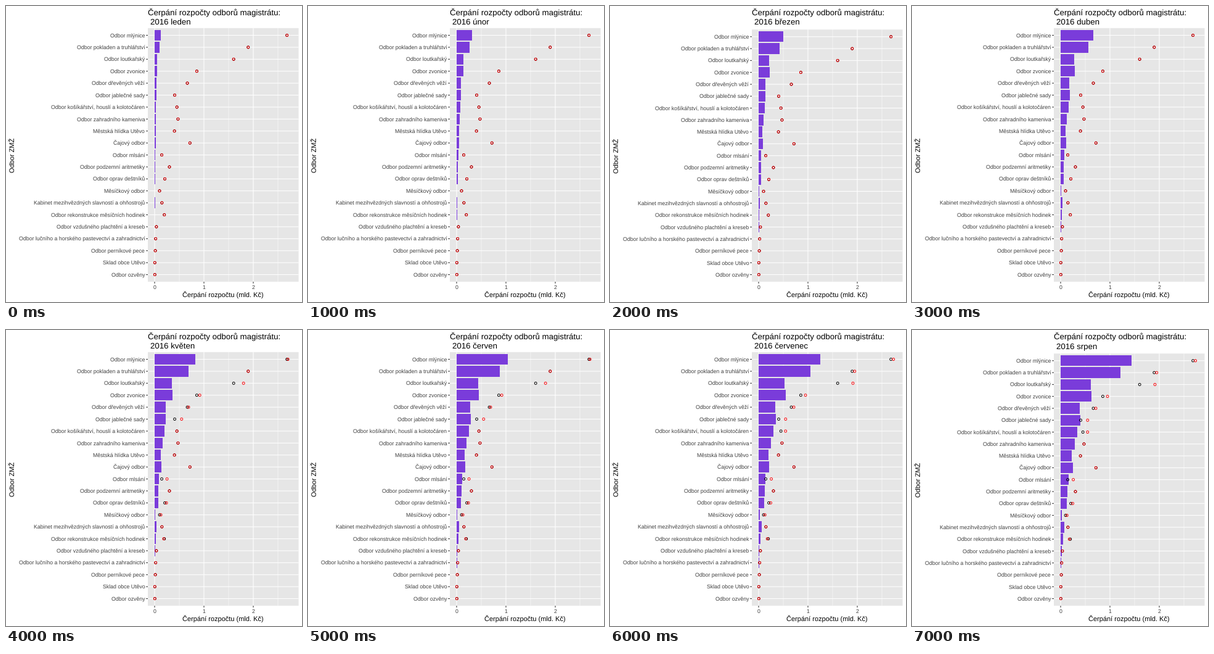
Recreate the animation shown at these times as a matplotlib script. Size 480x480 px, loop 8 s.

```python
import matplotlib.pyplot as plt
import numpy as np
from matplotlib.animation import FuncAnimation
from matplotlib.patches import Circle, Rectangle

plt.rcParams["font.family"] = "Liberation Sans"
plt.rcParams["text.hinting"] = "none"

SIZE = 480
LEFT, RIGHT, BOTTOM = 230, 474.5, 447.2
ZERO, UNIT = 241, 80
LAST_ROW = 435.6

PANEL, BAR, PLAN, REVISED = "#E6E6E6", "#7A3CDA", "#000000", "#FB0207"
TICK, LABEL = "#333333", "#404040"

MONTHS = ["leden", "únor", "březen", "duben",
          "květen", "červen", "červenec", "srpen"]
TALL_TITLE = ("březen", "srpen")

# Name, planned budget, final spending, then the budget increases
# valid from May and from July where there are any (billions).
DEPARTMENTS = [
    ("Odbor mlýnice", 2.683, 1.44, .02, .05),
    ("Odbor pokladen a truhlářství", 1.897, 1.21, 0, .05),
    ("Odbor loutkařský", 1.602, .61, .2, .31),
    ("Odbor zvonice", .855, .625, .06, .095),
    ("Odbor dřevěných věží", .663, .39, .025, .05),
    ("Odbor jablečné sady", .407, .4, .14, .14),
    ("Odbor košíkářství, houslí a kolotočáren", .452, .34, 0, .094),
    ("Odbor zahradního kameniva", .474, .285),
    ("Městská hlídka Utěvo", .402, .225),
    ("Čajový odbor", .716, .25),
    ("Odbor mlsání", .145, .16, .106, .112),
    ("Odbor podzemní aritmetiky", .3, .14),
    ("Odbor oprav deštníků", .207, .125, .032, .037),
    ("Měsíčkový odbor", .1, .025, .026, .028),
    ("Kabinet mezihvězdných slavností a ohňostrojů", .148, .075),
    ("Odbor rekonstrukce měsíčních hodinek", .197, .05, -.012, -.02),
    ("Odbor vzdušného plachtění a kreseb", .036, .02),
    ("Odbor lučního a horského pastevectví a zahradnictví", .021, .01),
    ("Odbor perníkové pece", .014, 0),
    ("Sklad obce Utěvo", .004, 0),
    ("Odbor ozvěny", .004, 0),
]

fig = plt.figure(figsize=(SIZE / 72, SIZE / 72), dpi=72, facecolor="white")
ax = fig.add_axes([0, 0, 1, 1])


def x_of(value):
    return ZERO + UNIT * value


def progress(month):
    """Share of the final spending reached by a month."""
    return np.interp(month, [0, 2, 4, 6, 7], [.085, .35, .57, .87, 1])


def line(x0, y0, x1, y1, color="white", width=1.07):
    ax.plot([x0, x1], [y0, y1], color=color, lw=width, snap=False,
            solid_capstyle="butt")


def rect(x, y, w, h, color, **kw):
    ax.add_patch(Rectangle((x, y), w, h, fc=color, lw=0, **kw))


def ring(x, y, color):
    ax.add_patch(Circle((x, y), 1.95, fill=False, ec=color, lw=0.95,
                        snap=False, zorder=4))


def text(x, y, s, size, color="black", ha="left", **kw):
    ax.text(x, y, s, size=size, color=color, ha=ha, va="baseline",
            rotation_mode="anchor", **kw)


def draw_grid(top, rows):
    rect(LEFT, top, RIGHT - LEFT, BOTTOM - top, PANEL, snap=False)
    for half in range(6):
        x = x_of(half / 2)
        line(x, top, x, BOTTOM, width=0.53 if half % 2 else 1.07)
    for y in rows:
        line(LEFT, y, RIGHT, y)


def draw_axes(top):
    for value in range(3):
        x = x_of(value)
        line(x, BOTTOM, x, BOTTOM + 2.8, TICK)
        text(x, 459, str(value), 8.8, LABEL, "center")
    text((LEFT + RIGHT) / 2, 472, "Čerpání rozpočtu (mld. Kč)", 11,
         ha="center")
    text(14.2, (top + BOTTOM) / 2, "Odbor ZMŽ", 11, ha="center", rotation=90)


def draw_row(y, step, month, name, plan, spent, may=0, july=0):
    line(LEFT - 2.8, y, LEFT, y, TICK)
    text(225.2, y + 3.2, name, 8.8, LABEL, "right")
    if spent:
        rect(ZERO, y - 0.45 * step, UNIT * spent * progress(month),
             0.9 * step, BAR, snap=True, zorder=3)
    extra = july if month >= 6 else may if month >= 4 else 0
    ring(x_of(plan), y, PLAN)
    ring(x_of(plan + extra), y, REVISED)


def draw(month):
    ax.clear()
    ax.set(xlim=(0, SIZE), ylim=(SIZE, 0))
    ax.axis("off")

    # Some month names make the title taller and push the panel down.
    first = 49.8 if MONTHS[month] in TALL_TITLE else 47.5
    rows, step = np.linspace(first, LAST_ROW, len(DEPARTMENTS), retstep=True)
    top = first - 0.6 * step

    draw_grid(top, rows)
    draw_axes(top)
    text(LEFT, 15.4, "Čerpání rozpočty odborů magistrátu:", 13.2)
    text(LEFT + 3.7, 29.8, "2016 " + MONTHS[month], 13.2)
    for y, department in zip(rows, DEPARTMENTS):
        draw_row(y, step, month, *department)


anim = FuncAnimation(fig, draw, frames=len(MONTHS), interval=1000,
                     init_func=lambda: None, repeat=True, repeat_delay=0,
                     blit=False)
plt.show()
```
